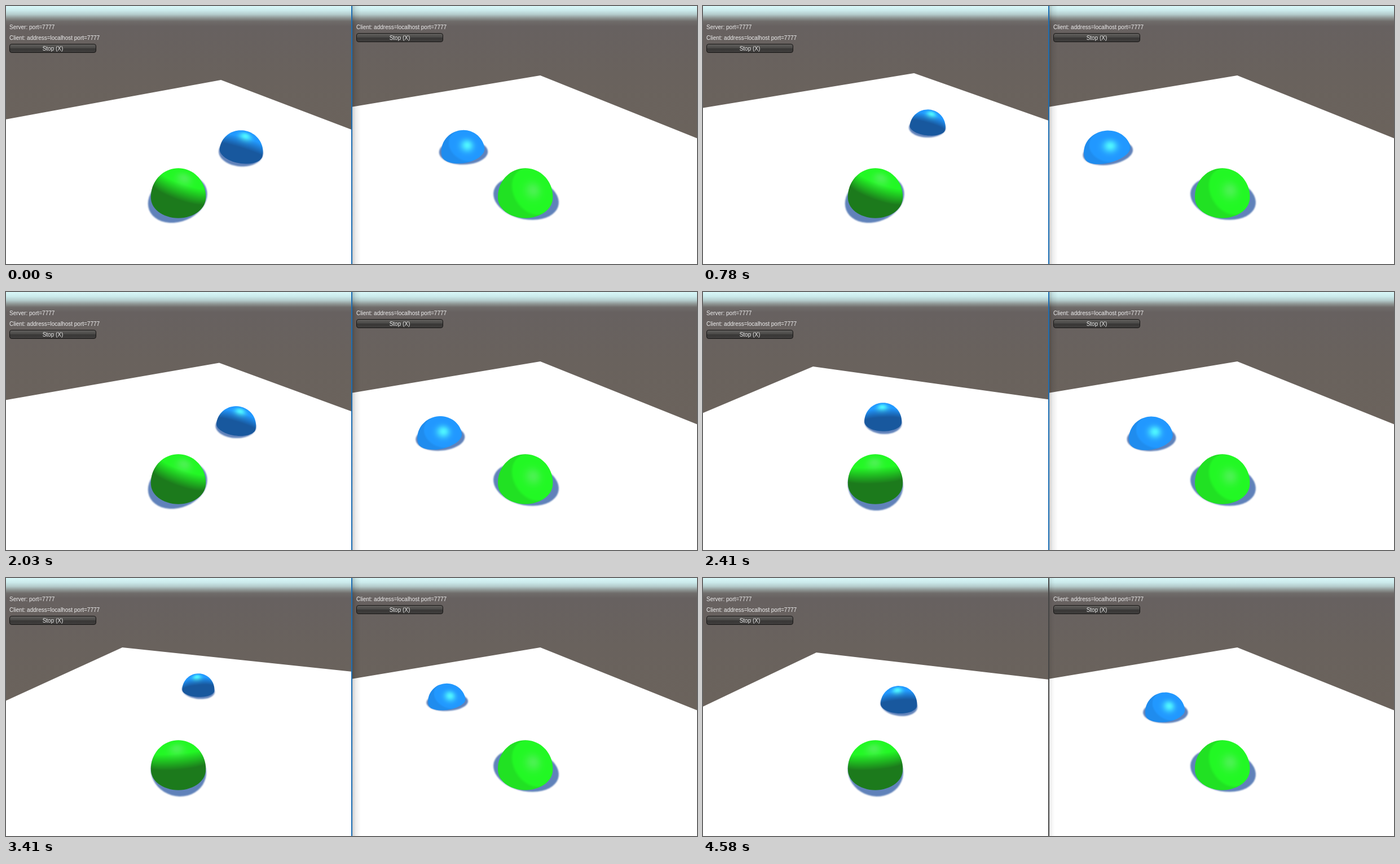
An HTML page with a canvas for the animation above (4.65 s loop, 1225x457 px).

```html
<!DOCTYPE html>
<html lang="en">
<head>
<meta charset="utf-8">
<title>Two networked players</title>
<style>
  html, body { margin: 0; width: 100%; height: 100%; overflow: hidden; }
  body {
    position: relative;
    background: linear-gradient(#d9f8f9 0, #cbeaeb 8px, #b4cbcb 15px, #8f9795 21px,
      #6f6c6a 27px, #676160 36px, #69625d 120px, #6b635c 240px);
    font: 10px/12px "Liberation Sans", Arial, sans-serif;
    color: #eee;
  }
  canvas, .label, .button, #divider { position: absolute; }
  canvas { left: 0; top: 0; }
  .label { white-space: pre; }
  .button {
    box-sizing: border-box; width: 154px; height: 16px;
    border: 1px solid #161514; border-radius: 4px;
    background: linear-gradient(#605e5c, #4b4a48 45%, #383736 55%, #403e3d);
    text-align: center; line-height: 15px;
  }
  #divider {
    left: 612px; top: 0; width: 17px; height: 457px;
    background: linear-gradient(90deg, #1b6db3 2px, rgba(0,0,0,.2) 2px, rgba(0,0,0,.07) 8px, transparent);
  }
  #divider.idle {
    background: linear-gradient(90deg, #454545 2px, rgba(0,0,0,.1) 2px, rgba(0,0,0,.03) 7px, transparent 12px);
  }
</style>
</head>
<body>
<canvas id="stage" width="1225" height="457"></canvas>
<div id="divider"></div>
<div class="label" style="left:6px;top:32px">Server: port=7777</div>
<div class="label" style="left:6px;top:51px">Client: address=localhost port=7777</div>
<div class="button" style="left:6px;top:67px">Stop (X)</div>
<div class="label" style="left:621px;top:32px">Client: address=localhost port=7777</div>
<div class="button" style="left:621px;top:48px">Stop (X)</div>
<script>
const ctx = document.getElementById('stage').getContext('2d');
const divider = document.getElementById('divider');
const scratch = document.createElement('canvas');
const scratchCtx = scratch.getContext('2d');

const FRAME_MS = 77.5, FRAMES = 60;
const RAD = Math.PI / 180;
const FOCAL = 396, CENTER_Y = 230;
const PITCH_SIN = Math.sin(30 * RAD), PITCH_COS = Math.cos(30 * RAD);
const CAM_UP = 3, CAM_BACK = 3;
const RADIUS = 0.5, HALF_PLANE = 5.09;
const LIGHT_BEARING = 62 * RAD, LIGHT_ELEVATION = 53 * RAD;

const GREEN = { dark: [28, 122, 28], lit: [34, 248, 36], shine: [40, -6, 44] };
const BLUE = { dark: [24, 88, 158], lit: [33, 152, 255], shine: [45, 92, 0] };
const REMOTE = { x: 1.61, z: 0.15, yaw: 301.2 };

// Host player: frame, x, z, yaw in degrees
const PATH = [
  [0, -.42, -.36, 30.2], [3, -.67, -.79, 30.2], [7, -.946, -1.264, 30.2],
  [10, -1.046, -1.436, 30.2], [21, -1.046, -1.436, 30.2], [26, -.7, -.835, 30.2],
  [28, -.57, -.62, 34], [31, -.51, -.55, 66.4], [33, -.52, -.55, 88],
  [39, -1.81, -.49, 89.6], [40, -1.95, -.49, 89.6], [43, -1.95, -.49, 70],
  [49, -.63, 0, 69.7], [50, -.57, .03, 69.6], [56, -.87, -.083, 69.6], [60, -.87, -.083, 69.6]
];

const mix = (a, b, k) => a + (b - a) * k;
const clamp = v => Math.max(0, Math.min(1, v));

function hostAt(frame) {
  const i = PATH.findIndex(p => p[0] > frame);
  const a = PATH[i - 1], b = PATH[i];
  const k = (frame - a[0]) / (b[0] - a[0]);
  const [, x, z, yaw] = a.map((v, n) => mix(v, b[n], k));
  return { x, z, yaw };
}

// Camera axes: right, down, depth. Ground coordinates are [side, ahead] of the camera.
const toCamera = (side, up, ahead) => [
  side,
  (CAM_UP - up) * PITCH_COS - ahead * PITCH_SIN,
  ahead * PITCH_COS + (CAM_UP - up) * PITCH_SIN
];

function toView(player, x, z) {
  const s = Math.sin(player.yaw * RAD), c = Math.cos(player.yaw * RAD);
  const dx = x - player.x, dz = z - player.z;
  return [dx * c - dz * s, dx * s + dz * c + CAM_BACK];
}

const toScreen = (cx, [r, d, z]) => [cx + FOCAL * r / z, CENTER_Y + FOCAL * d / z];

function trace(points) {
  ctx.beginPath();
  points.forEach(p => ctx.lineTo(...p));
  ctx.closePath();
}

function arc(from, to, steps, point) {
  return Array.from({ length: steps + 1 }, (_, i) => point(mix(from, to, i / steps)));
}

function drawPlane(view) {
  const h = HALF_PLANE, near = 0.1;
  const corners = [[-h, -h], [-h, h], [h, h], [h, -h]].map(([x, z]) => {
    const [side, ahead] = toView(view.player, x, z);
    return toCamera(side, 0, ahead);
  });
  const visible = [];
  corners.forEach((a, i) => {
    const b = corners[(i + 1) % 4];
    if (a[2] > near) visible.push(a);
    if ((a[2] > near) !== (b[2] > near)) {
      const k = (near - a[2]) / (b[2] - a[2]);
      visible.push(a.map((v, n) => mix(v, b[n], k)));
    }
  });
  trace(visible.map(p => toScreen(view.cx, p)));
  ctx.fillStyle = '#fff';
  ctx.fill();
}

function drawShadow(view, [side, ahead]) {
  const a = LIGHT_BEARING + Math.PI - view.player.yaw * RAD;
  const s = Math.sin(a), c = Math.cos(a);
  const length = RADIUS / Math.sin(LIGHT_ELEVATION);
  trace(arc(0, 2 * Math.PI, 48, t => {
    const along = length * Math.cos(t), across = RADIUS * Math.sin(t);
    return toScreen(view.cx, toCamera(side + along * s + across * c, 0, ahead + along * c - across * s));
  }));
  ctx.filter = 'blur(0.9px)';
  ctx.fillStyle = '#6082ba';
  ctx.fill();
  ctx.filter = 'none';
}

// Outline of a half sphere resting on the ground
function domeOutline(view, [side, ahead]) {
  const flat = Math.hypot(side, ahead), dist = Math.hypot(flat, CAM_UP);
  const nx = -side / flat, nz = -ahead / flat;
  const sh = CAM_UP / dist, ch = flat / dist;
  const lift = RADIUS * RADIUS / dist;
  const rim = RADIUS * Math.sqrt(1 - (RADIUS / dist) ** 2);
  const start = -Math.asin(sh * lift / (rim * ch));
  const contact = Math.acos(rim * Math.cos(start) / RADIUS);
  const place = (across, toward, up) => toScreen(view.cx,
    toCamera(side - across * nz + toward * nx, up, ahead + across * nx + toward * nz));
  const top = arc(start, Math.PI - start, 40, t => place(
    rim * Math.cos(t), ch * lift - sh * rim * Math.sin(t), sh * lift + ch * rim * Math.sin(t)));
  const base = arc(Math.PI - contact, contact, 30, t => place(
    RADIUS * Math.cos(t), RADIUS * Math.sin(t), 0));
  return top.concat(base);
}

function lightFor(view) {
  const a = LIGHT_BEARING - view.player.yaw * RAD;
  const flat = Math.cos(LIGHT_ELEVATION), up = Math.sin(LIGHT_ELEVATION);
  const ahead = flat * Math.cos(a);
  return [flat * Math.sin(a), -up * PITCH_COS - ahead * PITCH_SIN, ahead * PITCH_COS - up * PITCH_SIN];
}

const dot = (a, b) => a[0] * b[0] + a[1] * b[1] + a[2] * b[2];

function drawBall(view, ground, paint) {
  const outline = domeOutline(view, ground);
  const xs = outline.map(p => p[0]), ys = outline.map(p => p[1]);
  const left = Math.floor(Math.min(...xs)) - 1, top = Math.floor(Math.min(...ys)) - 1;
  const w = Math.ceil(Math.max(...xs)) + 1 - left, h = Math.ceil(Math.max(...ys)) + 1 - top;
  const center = toCamera(ground[0], 0, ground[1]);
  const reach = dot(center, center) - RADIUS * RADIUS;
  const light = lightFor(view);
  const image = new ImageData(w, h);

  for (let y = 0; y < h; y++) for (let x = 0; x < w; x++) {
    const ray = [(left + x + .5 - view.cx) / FOCAL, (top + y + .5 - CENTER_Y) / FOCAL, 1];
    const rr = dot(ray, ray), rc = dot(ray, center);
    const t = (rc - Math.sqrt(Math.max(0, rc * rc - rr * reach))) / rr;
    const normal = ray.map((v, i) => (v * t - center[i]) / RADIUS);
    const half = ray.map((v, i) => light[i] - v / Math.sqrt(rr));
    const lit = Math.max(view.fill, clamp((dot(normal, light) - .08) / .5));
    const shine = Math.max(0, dot(normal, half) / Math.hypot(...half)) ** 24;
    const at = 4 * (y * w + x);
    for (let i = 0; i < 3; i++)
      image.data[at + i] = mix(paint.dark[i], paint.lit[i], lit) + paint.shine[i] * shine;
    image.data[at + 3] = 255;
  }
  scratch.width = w;
  scratch.height = h;
  scratchCtx.putImageData(image, 0, 0);
  ctx.save();
  trace(outline);
  ctx.clip();
  ctx.drawImage(scratch, left, top);
  ctx.restore();
}

function drawView(view) {
  ctx.save();
  ctx.beginPath();
  ctx.rect(view.left, 0, view.width, 457);
  ctx.clip();
  drawPlane(view);
  const self = [0, CAM_BACK];
  const other = toView(view.player, view.other.x, view.other.z);
  drawShadow(view, other);
  drawShadow(view, self);
  drawBall(view, other, BLUE);
  drawBall(view, self, GREEN);
  ctx.restore();
}

function draw(frame) {
  const host = hostAt(frame);
  ctx.clearRect(0, 0, 1225, 457);
  drawView({ left: 0, width: 612, cx: 305.5, player: host, other: REMOTE, fill: 0 });
  drawView({ left: 613, width: 612, cx: 920.7, player: REMOTE, other: host, fill: .82 });
  divider.className = frame === FRAMES - 1 ? 'idle' : '';
}

let shown = -1;
const begin = performance.now();
function tick() {
  const frame = Math.floor((performance.now() - begin) / FRAME_MS) % FRAMES;
  if (frame !== shown) draw(shown = frame);
  requestAnimationFrame(tick);
}
tick();
</script>
</body>
</html>
```
